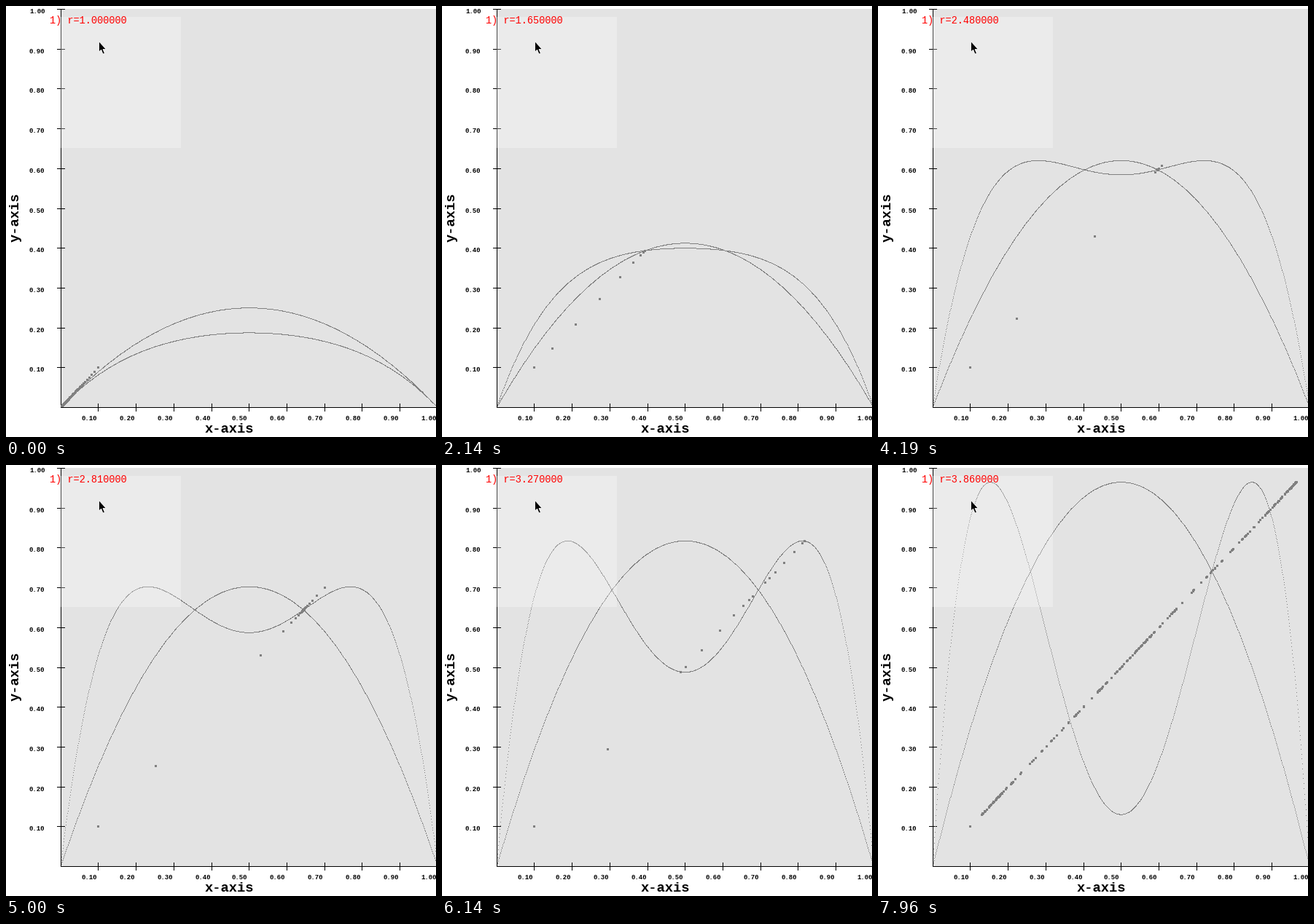
These frames come from a looping animation (590 by 592 pixels, 8000 ms). A matplotlib script:

```python
import numpy as np
import matplotlib.pyplot as plt
from matplotlib.animation import FuncAnimation
from matplotlib.patches import Polygon
from matplotlib.transforms import Affine2D

W, H, DPI = 590, 592, 64
LOOP, STEP = 8000, 20
GRAY, PLOT_BG = 128, 227
ORBIT_LEN = 300

# Runs of redraws: first time, last time, count
RUNS = [(600, 1380, 15), (1440, 2200, 14), (2250, 3050, 15), (3110, 3900, 15),
        (3960, 4710, 14), (4770, 5520, 14), (5580, 6370, 15), (6430, 7200, 14),
        (7260, 7660, 8), (7960, 7960, 1)]
TIMES = np.concatenate([[0]] + [np.linspace(*run).round(-1) for run in RUNS])
RATES = np.interp(TIMES,
                  [540, 2140, 3160, 4190, 5000, 6140, 7660, 7960],
                  [1.0, 1.65, 2.07, 2.48, 2.81, 3.27, 3.84, 3.86]).round(2)


def col(x):
    return np.floor(75.2 + 517 * np.asarray(x)).astype(int)


def row(y):
    return np.floor(551.5 - 547 * np.asarray(y)).astype(int)


def logistic(r, x):
    return r * x * (1 - x)


def orbit(r, x=0.1):
    points = []
    for _ in range(ORBIT_LEN):
        points.append(x)
        x = logistic(r, x)
    return np.array(points)


def make_base():
    img = np.full((H, W, 3), 255, np.uint8)
    img[4:552, 75:] = PLOT_BG
    img[4:552, 75] = 0
    img[551, 75:] = 0
    for k in range(1, 11):
        img[row(k / 10), 70:81] = 0
        if k < 10:
            img[546:557, col(k / 10)] = 0
    return img


BASE = make_base()
XS = np.arange(2, 1000) / 1000
XS = XS[col(XS) < W]


def render(r):
    img = BASE.copy()
    first = logistic(r, XS)
    for ys in (first, logistic(r, first)):
        img[row(ys), col(XS)] = GRAY
    pts = orbit(r)
    px, py = col(pts), row(pts)
    for dx in (-1, 0, 1):
        for dy in (-1, 0, 1):
            img[py + dy, px + dx] = GRAY
    # Translucent white panel lies over the curves
    panel = img[15:195, 75:240]
    panel[:] = panel + 0.29 * (255.0 - panel)
    return img


fig = plt.figure(figsize=(W / DPI, H / DPI), dpi=DPI, facecolor="white")
to_fig = Affine2D().scale(1 / W, -1 / H).translate(0, 1) + fig.transFigure


def label(x, y, text, size, **kw):
    return fig.text(x, y, text, fontsize=size * 72 / DPI, transform=to_fig,
                    family="Liberation Mono", ha="left", va="baseline", **kw)


picture = fig.figimage(render(1.0), origin="upper")

for k in range(1, 11):
    name = f"{k / 10:.2f}"
    label(32, row(k / 10) + 6, name, 9, weight="bold")
    label(col(k / 10) - 23, 569, name, 9, weight="bold")
label(273, 586, "x-axis", 18.7, weight="bold")
label(18, 324, "y-axis", 18.7, weight="bold", rotation=90,
      rotation_mode="anchor")
readout = label(60, 24, "", 13.6, color="red")

arrow = [(127.5, 48.5), (127.5, 63), (130.6, 60.2), (133, 66), (135.4, 65),
         (133, 59.4), (137.3, 59.4)]
fig.add_artist(Polygon(arrow, closed=True, facecolor="black",
                       edgecolor="white", linewidth=0.9, transform=to_fig))


def update(i):
    now = i * STEP + STEP / 2
    r = RATES[np.searchsorted(TIMES, now, side="right") - 1]
    picture.set_data(render(r))
    readout.set_text(f"1) r={r:.6f}")
    return picture, readout


anim = FuncAnimation(fig, update, frames=LOOP // STEP, interval=STEP,
                     repeat=True, repeat_delay=0)
plt.show()
```
